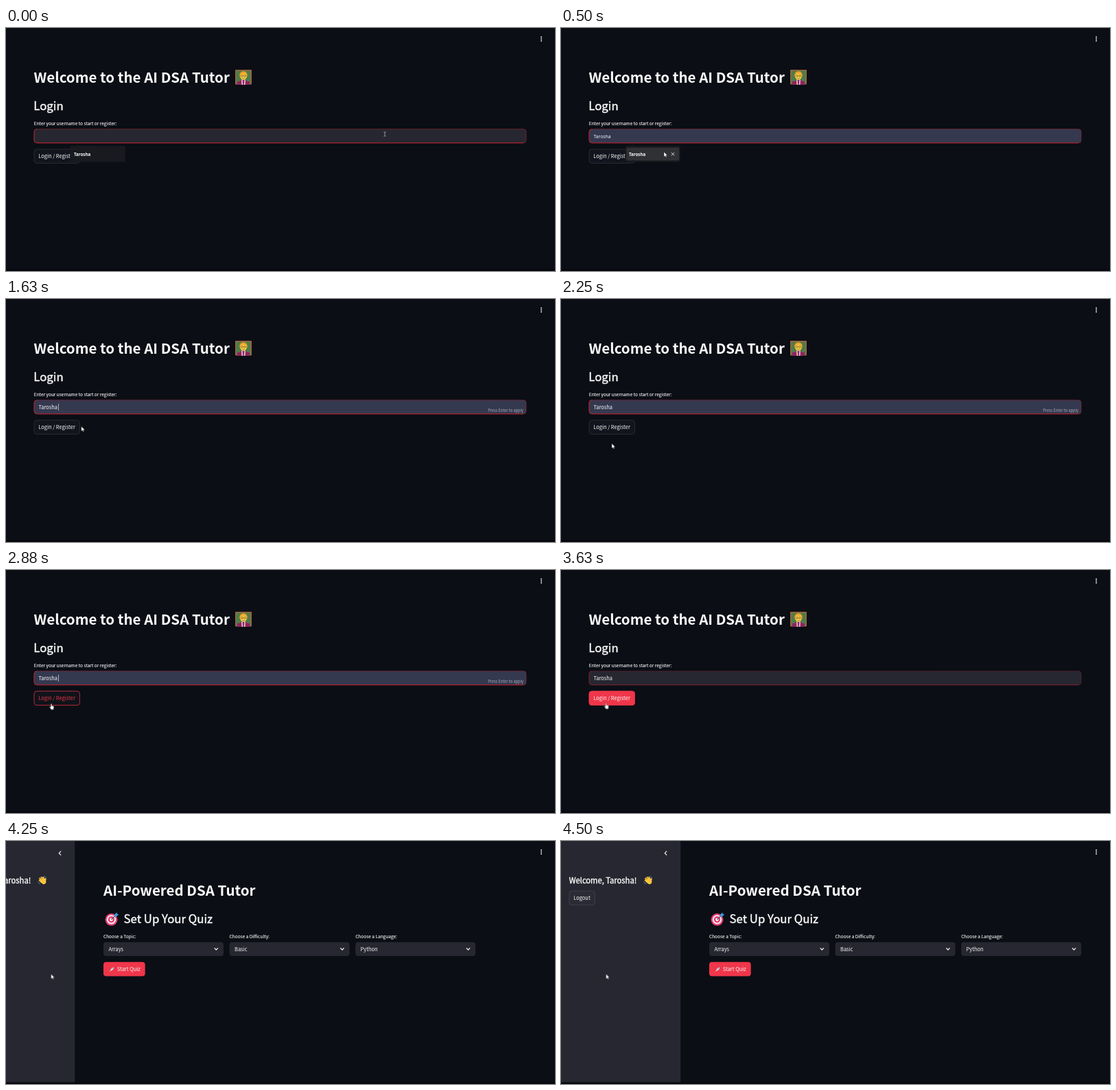
Recreate the animation shown at these times as an HTML page. Size 800 by 355 pixels, loop 5010 ms.

```html
<!DOCTYPE html>
<html lang="en">
<head>
<meta charset="utf-8">
<title>AI DSA Tutor</title>
<style>
html, body { margin: 0; width: 100%; height: 100%; overflow: hidden; background: #0b0e15; }
svg { display: block; width: 100%; height: 100%; }
text { font-family: "Noto Sans CJK JP", "Noto Sans CJK SC", "Noto Sans", sans-serif; font-size: 7.46px; fill: #fafafa; white-space: pre; }
.title { font-size: 20.52px; font-weight: 700; }
.heading { font-size: 16.8px; stroke: #fafafa; stroke-width: .4px; }
.greeting { font-size: 11.2px; stroke: #fafafa; stroke-width: .4px; }
.label { font-size: 6.53px; stroke: #fafafa; stroke-width: .1px; }
.hint { font-size: 5.6px; fill: #a9abb5; text-anchor: end; }
.system { font-family: "Open Sans", "Noto Sans", sans-serif; font-size: 6.9px; }
.system.bold { font-size: 6.2px; font-weight: 700; }
.field { fill: #262730; }
.line { fill: none; stroke: #fafafa; stroke-width: 1.2; stroke-linecap: round; stroke-linejoin: round; }

/* Every state change is a hard cut on one shared 5010 ms clock. */
.t { animation: 5010ms step-end infinite; }
.login { animation-name: login; }
.home { animation-name: home; }
.sidebar { animation-name: sidebar; }
.main { animation-name: main; }
.popup { animation-name: popup; }
.preview { animation-name: preview; }
.filled { animation-name: filled; }
.tint { animation-name: tint; }
.apply { animation-name: apply; }
.focus { animation-name: focus; }
.caret-start { animation-name: caret-start; }
.caret-end { animation-name: caret-end; }
.hover { animation-name: hover; }
.active { animation-name: active; }
.pointer { animation-name: pointer; }
.beam { animation-name: beam; }
.arrow { animation-name: arrow; }
.hand { animation-name: hand; }

@keyframes login { 0% { opacity: 1 } 84.83%, to { opacity: 0 } }
@keyframes home { 0% { opacity: 0 } 84.83%, to { opacity: 1 } }
@keyframes sidebar {
  0% { transform: translateX(-174px) } 84.83% { transform: translateX(-74px) }
  87.43% { transform: translateX(-14px) } 89.82%, to { transform: none }
}
@keyframes main {
  0% { transform: translateX(-174px) } 84.83% { transform: translateX(-74px) }
  87.43% { transform: translateX(-14px) } 89.82%, to { transform: none }
}
@keyframes popup { 0% { opacity: 1 } 27.54%, to { opacity: 0 } }
@keyframes preview { 0% { opacity: 0 } 9.98% { opacity: 1 } 27.54%, to { opacity: 0 } }
@keyframes filled { 0% { opacity: 0 } 27.54%, to { opacity: 1 } }
@keyframes tint { 0% { opacity: 0 } 9.98% { opacity: 1 } 72.45%, to { opacity: 0 } }
@keyframes apply { 0% { opacity: 0 } 29.94% { opacity: 1 } 72.45%, to { opacity: 0 } }
@keyframes focus {
  0% { opacity: 1 } 72.45% { opacity: .6 } 74.85% { opacity: .35 }
  77.44% { opacity: .15 } 79.84%, to { opacity: 0 }
}
@keyframes caret-start { 0% { opacity: 0 } 19.96% { opacity: 1 } 27.54%, to { opacity: 0 } }
@keyframes caret-end {
  0% { opacity: 0 } 27.54% { opacity: 1 } 39.92% { opacity: 0 } 49.9% { opacity: 1 }
  59.88% { opacity: 0 } 69.86% { opacity: 1 } 72.45%, to { opacity: 0 }
}
@keyframes hover { 0% { opacity: 0 } 52.49%, to { opacity: 1 } }
@keyframes active { 0% { opacity: 0 } 69.86% { opacity: 1 } 79.84%, to { opacity: 0 } }
@keyframes beam { 0% { opacity: 1 } 7.58%, to { opacity: 0 } }
@keyframes arrow {
  0% { opacity: 0 } 7.58% { opacity: 1 } 52.49% { opacity: 0 } 84.83%, to { opacity: 1 }
}
@keyframes hand { 0% { opacity: 0 } 52.49% { opacity: 1 } 84.83%, to { opacity: 0 } }
@keyframes pointer {
  0% { transform: translate(552px, 155px) }
  2.59% { transform: translate(488px, 157px) }
  4.99% { transform: translate(372px, 163px) }
  7.58% { transform: translate(238px, 173px) }
  9.98% { transform: translate(150px, 181px) }
  12.57% { transform: translate(122px, 184.5px) }
  14.97% { transform: translate(114px, 185.5px) }
  17.56% { transform: translate(111px, 186px) }
  19.96% { transform: translate(109.7px, 186px) }
  37.52% { transform: translate(108px, 189px) }
  39.92% { transform: translate(102px, 196px) }
  42.51% { transform: translate(90px, 205px) }
  44.91% { transform: translate(74px, 211px) }
  47.5% { transform: translate(62px, 212px) }
  49.9% { transform: translate(61px, 202px) }
  52.49% { transform: translate(63px, 198px) }
  54.89% { transform: translate(65px, 196px) }
  57.48% { transform: translate(66px, 195.2px) }
  62.47%, to { transform: translate(65.6px, 194.3px) }
}
</style>
</head>
<body>
<svg viewBox="0 0 800 355" preserveAspectRatio="none">
  <defs>
    <path id="chevron" class="line" d="M-2.3-1.2L0 1.2L2.3-1.2"/>
    <g id="teacher">
      <rect width="24" height="21.5" rx="1" fill="#a0633f"/>
      <rect x="1.6" y="1.6" width="20.8" height="18.3" fill="#4c7d49"/>
      <path d="M4 22C4 16.5 7.5 14.5 12 14.5S20 16.5 20 22Z" fill="#a3266f"/>
      <path d="M9 14.5H15L14.5 22H9.5Z" fill="#e9c9a0"/>
      <path d="M10.6 15H13.4L12.8 22H11.2Z" fill="#7d2a8c"/>
      <circle cx="12" cy="7.8" r="5.8" fill="#e59a28"/>
      <ellipse cx="12" cy="9.6" rx="4.4" ry="5" fill="#fbd04b"/>
      <path d="M7.2 8Q8 3 12 4.2Q16.5 3 16.8 8Q14.5 5.6 12 6.3Q9 5.8 7.2 8Z" fill="#f0ae32"/>
      <g fill="none" stroke="#5c4225" stroke-width=".6">
        <circle cx="10" cy="9" r="1.4"/><circle cx="14" cy="9" r="1.4"/>
        <path d="M10.3 12.4Q12 13.6 13.7 12.4"/>
      </g>
      <path d="M3 17H9V22H3ZM15 17H21V22H15Z" fill="#8d2364"/>
    </g>
    <g id="wave">
      <g fill="none" stroke="#fbc43c" stroke-width="2" stroke-linecap="round">
        <path d="M3.2 3.5L7 8M5.5 2L8.5 6.6M8.2 2L10.2 6M2.7 6.3L6 9.5M11.7 4.2L11 8"/>
      </g>
      <ellipse cx="8.7" cy="8.2" rx="3.4" ry="3.9" fill="#fbc43c" transform="rotate(-35 8.7 8.2)"/>
      <path d="M9.8.7Q12 1 12.7 3M.8 8.6Q1.4 11 3.5 11.6" fill="none" stroke="#48a0d8" stroke-width=".8" stroke-linecap="round"/>
    </g>
    <g id="dart">
      <circle cx="9" cy="11" r="9" fill="#e43d72"/>
      <circle cx="9" cy="11" r="6.8" fill="#f6e9ee"/>
      <circle cx="9" cy="11" r="4.7" fill="#e43d72"/>
      <circle cx="9" cy="11" r="2.4" fill="#f6e9ee"/>
      <path d="M9 11L16 4" stroke="#34506f" stroke-width="1.2"/>
      <path d="M13.2 6.8L13.6 3.6L16.8.4L17.2 2.8L19.8 3.4L16.5 6.5Z" fill="#3c9bdc"/>
    </g>
    <g id="rocket">
      <path d="M1.6 4L3.5 3.3L5 5L4.2 6.8Z" fill="#b0284e"/>
      <path d="M2 5.8Q3 2 7.6.4Q7.2 4.8 2.9 6.5Z" fill="#dfe3ea"/>
      <path d="M6 .9L7.6.4L7.2 2.1Z" fill="#b0284e"/>
      <circle cx="5.3" cy="2.8" r=".8" fill="#3c9bdc"/>
      <path d="M2 5.7L.4 7.7L2.8 6.6Z" fill="#fbc43c"/>
    </g>
  </defs>

  <rect width="800" height="355" fill="#0b0e15"/>

  <g class="t login">
    <text class="title" x="40.5" y="79.5">Welcome to the AI DSA Tutor</text>
    <use href="#teacher" x="334" y="61"/>
    <text class="heading" x="40.3" y="120">Login</text>
    <text class="label" x="40.8" y="141.6">Enter your username to start or register:</text>

    <rect class="field" x="41" y="147.7" width="717" height="20.2" rx="4"/>
    <rect class="t tint" x="41" y="147.7" width="717" height="20.2" rx="4" fill="#343950"/>
    <g class="t focus" fill="none">
      <rect x="41" y="147.7" width="717" height="20.2" rx="4" stroke="#7d2733" stroke-width=".8"/>
      <path d="M45 147.7Q41 147.7 41 151.7V163.9Q41 167.9 45 167.9H754" stroke="#b8222f" stroke-width=".9"/>
    </g>
    <text class="t filled" x="47.4" y="160.8">Tarosha</text>
    <text class="t preview system" x="47.4" y="160.6">Tarosha</text>
    <path class="t caret-start" d="M47.3 153V163" stroke="#fafafa" stroke-width=".6"/>
    <path class="t caret-end" d="M76.5 153V163" stroke="#fafafa" stroke-width=".6"/>
    <text class="t apply hint" x="754" y="164.5">Press Enter to apply</text>

    <rect x="41" y="177" width="66.5" height="20.5" rx="4" fill="#12151d" stroke="#34363f" stroke-width=".7"/>
    <text x="47.3" y="190">Login / Register</text>
    <g class="t hover">
      <rect x="41" y="177" width="66.5" height="20.5" rx="4" fill="#10131a" stroke="#d52b3b" stroke-width=".8"/>
      <text x="47.3" y="190" style="fill:#e93545">Login / Register</text>
    </g>
    <g class="t active">
      <rect x="40.7" y="176.7" width="67" height="21" rx="4" fill="#f0364a"/>
      <text x="47.3" y="190">Login / Register</text>
    </g>

    <g class="t popup">
      <path d="M101 172.5L104 169.8L107 172.5Z" fill="#181a1f"/>
      <rect x="93.5" y="172.3" width="80.3" height="23.5" rx="3" fill="#181a1f"/>
      <g class="t preview">
        <rect x="95.3" y="174.8" width="77" height="18.8" rx="2" fill="#303135"/>
        <path class="line" style="stroke-width:.8" d="M161 182.2L165 186.2M165 182.2L161 186.2"/>
      </g>
      <text class="system bold" x="99" y="186.7">Tarosha</text>
    </g>
  </g>

  <g class="t home">
    <g class="t main">
      <text class="title" x="216" y="79.5">AI-Powered DSA Tutor</text>
      <use href="#dart" x="218.5" y="103.8"/>
      <text class="heading" x="245.6" y="120">Set Up Your Quiz</text>
      <g id="selects"></g>
      <rect x="216" y="176.8" width="60.7" height="20.8" rx="4" fill="#f0364a"/>
      <use href="#rocket" x="224" y="183.3"/>
      <text x="235.8" y="190">Start Quiz</text>
    </g>
    <g class="t sidebar">
      <rect width="174.3" height="355" fill="#262730"/>
      <path class="line" d="M153.8 15.2L151.2 17.8L153.8 20.4"/>
      <text class="greeting" x="11.7" y="61.5">Welcome, Tarosha!</text>
      <use href="#wave" x="120" y="51"/>
      <rect x="12" y="73" width="37.5" height="20.6" rx="4" fill="#2a2b34" stroke="#474852" stroke-width=".7"/>
      <text x="18.3" y="86">Logout</text>
    </g>
  </g>

  <g fill="#fafafa">
    <circle cx="780" cy="13.2" r=".95"/><circle cx="780" cy="16" r=".95"/><circle cx="780" cy="18.8" r=".95"/>
  </g>
  <rect y="352.5" width="800" height="2.5" fill="#07070f"/>

  <g class="t pointer">
    <path class="t beam" d="M-1.6-3H-.4L0-2.6L.4-3H1.6M0-2.6V2.6M-1.6 3H-.4L0 2.6L.4 3H1.6" fill="none" stroke="#c5c6cc" stroke-width=".7"/>
    <path class="t arrow" d="M0 0V7.2L1.7 5.7L2.8 8L3.9 7.5L2.9 5.2H5Z" fill="#fff" stroke="#111" stroke-width=".4"/>
    <path class="t hand" d="M-.8.8Q-.8 0 0 0T.8.8V3L3 3.5Q4 3.8 3.9 5L3.4 7.2V8.7H-.8V7.5L-2.6 5.2Q-2.6 4.2-1.6 4.4L-.8 5Z" fill="#fff" stroke="#111" stroke-width=".4"/>
  </g>
</svg>
<script>
const choices = [["Topic", "Arrays"], ["Difficulty", "Basic"], ["Language", "Python"]];
document.getElementById("selects").innerHTML = choices.map(([name, value], i) => {
  const x = 216 + i * 183.6;
  return `<text class="label" x="${x}" y="141.6">Choose a ${name}:</text>
    <rect class="field" x="${x}" y="147.7" width="175" height="20.2" rx="4"/>
    <text x="${x + 7.4}" y="160.8">${value}</text>
    <use href="#chevron" x="${x + 164.3}" y="157.8"/>`;
}).join("");
</script>
</body>
</html>
```
